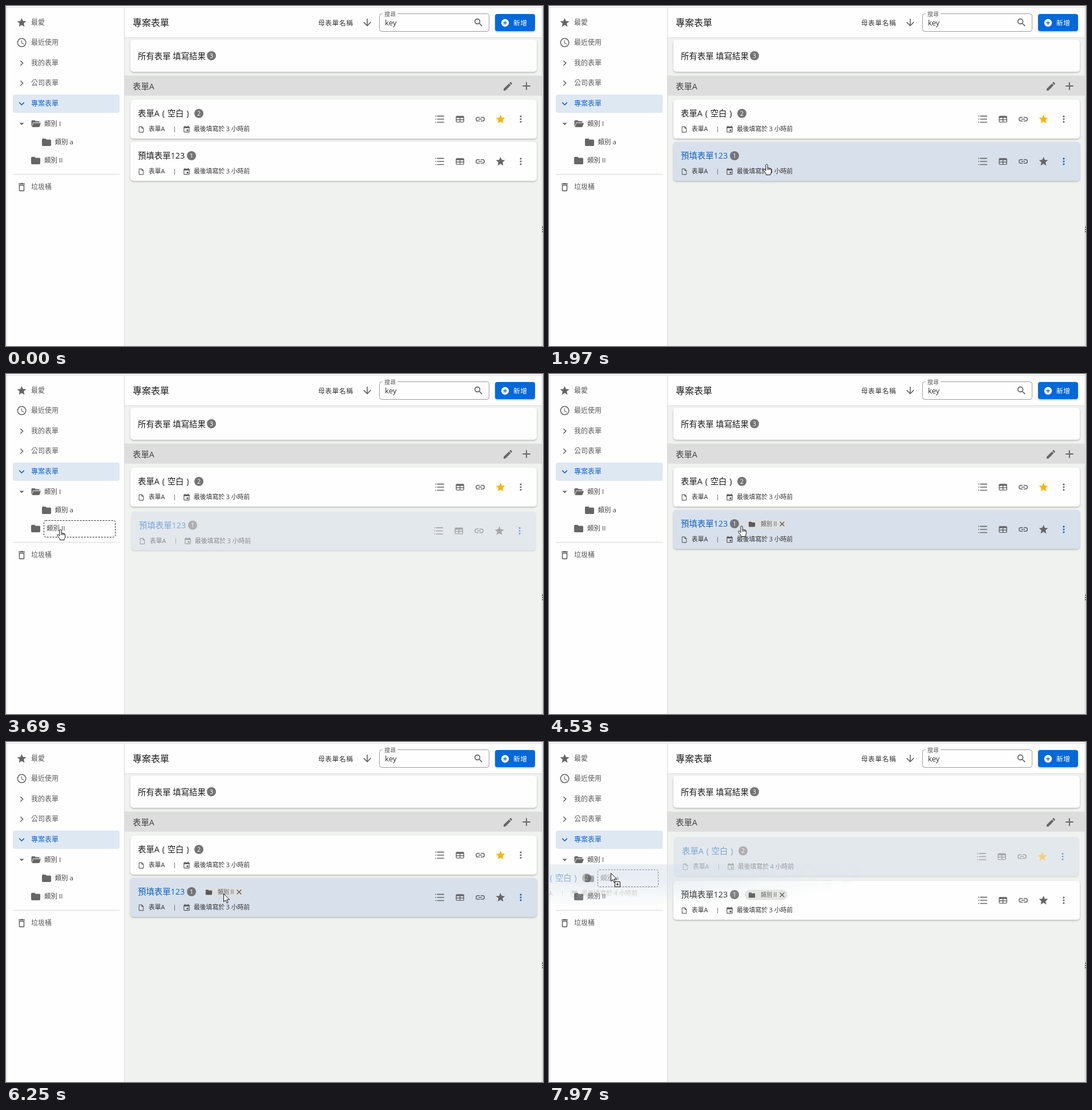
Write an HTML page with a canvas that moves like this. It is 941x595 px and loops after 8000 ms.

```html
<!DOCTYPE html>
<html lang="zh-Hant">
<head>
<meta charset="utf-8">
<title>專案表單</title>
<style>
html, body { margin: 0; width: 100%; height: 100%; overflow: hidden; background: #f0f2f0; }
canvas { display: block; }
</style>
</head>
<body>
<canvas id="stage" width="941" height="595"></canvas>
<script>
const W = 941, H = 595, LOOP = 8000;
const FONT = '"Open Sans", "Noto Sans CJK TC", "Noto Sans CJK JP", "Noto Sans CJK", sans-serif';
const WHITE = '#fdfefd', BLUE = '#1265c4', GREY = '#666', INK = '#1e1e1e', SOFT = '#5a5a5a';

// Icons on a 24 unit grid
const ICON = {
  star: 'M12 17.27 18.18 21l-1.64-7.03L22 9.24l-7.19-.61L12 2 9.19 8.63 2 9.24l5.46 4.73L5.82 21z',
  clock: 'M12 2a10 10 0 1 0 .01 0zM12 4a8 8 0 1 1-.01 0zM12.5 7H11v6l5.25 3.15.75-1.23-4.5-2.67z',
  right: 'M10 6 8.59 7.41 13.17 12l-4.58 4.59L10 18l6-6z',
  down: 'M16.59 8.59 12 13.17 7.41 8.59 6 10l6 6 6-6z',
  caret: 'M7 10l5 5 5-5z',
  folder: 'M10 4H4q-2 0-2 2v12q0 2 2 2h16q2 0 2-2V8q0-2-2-2h-8z',
  open: 'M2 18V6q0-2 2-2h6l2 2h7q2 0 2 2v1H6L3 18zM6.7 10.3H24l-2.8 8q-.6 1.7-2.4 1.7H3.2z',
  trash: 'M6 19c0 1.1.9 2 2 2h8c1.1 0 2-.9 2-2V7H6zM8 9h8v10H8zM15.5 4l-1-1h-5l-1 1H5v2h14V4z',
  search: 'M15.5 14h-.79l-.28-.27A6.5 6.5 0 1 0 13.73 14.43l.27.28v.79l5 4.99L20.49 19zM9.5 14a4.5 4.5 0 1 1 .01 0z',
  arrow: 'M20 12l-1.41-1.41L13 16.17V4h-2v12.17l-5.58-5.59L4 12l8 8z',
  plusDisc: 'M12 2a10 10 0 1 0 .01 0zM17 13h-4v4h-2v-4H7v-2h4V7h2v4h4z',
  plus: 'M19 13h-6v6h-2v-6H5v-2h6V5h2v6h6z',
  pencil: 'M3 17.25V21h3.75L17.81 9.94l-3.75-3.75zM20.71 7.04c.39-.39.39-1.02 0-1.41l-2.34-2.34a1 1 0 0 0-1.41 0l-1.83 1.83 3.75 3.75z',
  list: 'M2 4h2v2H2zM2 11h2v2H2zM2 18h2v2H2zM6 4h16v2H6zM6 11h16v2H6zM6 18h16v2H6z',
  table: 'M5 4h14q3 0 3 3v10q0 3-3 3H5q-3 0-3-3V7q0-3 3-3zM4 9v3.5h7V9zM13 9v3.5h7V9zM4 14.5V18h7v-3.5zM13 14.5V18h7v-3.5z',
  link: 'M3.9 12c0-1.71 1.39-3.1 3.1-3.1h4V7H7a5 5 0 0 0 0 10h4v-1.9H7c-1.71 0-3.1-1.39-3.1-3.1zM8 13h8v-2H8zM17 7h-4v1.9h4a3.1 3.1 0 0 1 0 6.2h-4V17h4a5 5 0 0 0 0-10z',
  more: 'M12 4a2 2 0 1 0 .01 0zM12 10a2 2 0 1 0 .01 0zM12 16a2 2 0 1 0 .01 0z',
  page: 'M14 2H6q-2 0-2 2v16q0 2 2 2h12q2 0 2-2V8zM6 20V4h7v5h5v11z',
  date: 'M17 12h-5v5h5zM16 1v2H8V1H6v2H5q-2 0-2 2v14q0 2 2 2h14q2 0 2-2V5q0-2-2-2h-1V1zM19 19H5V8h14z',
  close: 'M19 6.41 17.59 5 12 10.59 6.41 5 5 6.41 10.59 12 5 17.59 6.41 19 12 13.41 17.59 19 19 17.59 13.41 12z'
};
for (const k in ICON) ICON[k] = new Path2D(ICON[k]);

const ARROW = new Path2D('M0 0V14.2l3.2-3 2.3 5.2 2.2-1-2.3-5H10z');
const HAND = new Path2D('M-1.6 1.6q1.6-2.6 3.2 0V7q1.2-.8 2.3.4 1.3-.7 2.3.6 1.6-.3 1.9 1.3v4q0 2-1.5 3.6V19h-7.6v-1.8L-5 12q-1.2-2 0-2.7 1.3-.4 2.3 1.1l1.1 1.4z');

// Pointer track: time, x, y
const TRACK = [
  [500, 302, 338], [700, 326, 255], [900, 330, 190], [1080, 331, 140], [1300, 332, 140],
  [1500, 348, 175], [1650, 370, 238], [1800, 380, 275], [1970, 381, 276], [2190, 381, 277],
  [2350, 365, 277], [2700, 235, 275], [3000, 142, 272], [3300, 96, 271], [3860, 94, 271],
  [4100, 160, 270], [4500, 330, 265], [4700, 374, 265], [5000, 381, 265], [6420, 381, 265],
  [6600, 383, 235], [6750, 383, 205], [6900, 383, 180], [7170, 383, 180], [7250, 380, 179],
  [7350, 360, 184], [7700, 195, 215], [7880, 120, 228], [7970, 108, 229], [8000, 108, 229]
];
const DRAGS = [
  { card: 'b', from: 2190, drop: 3640, end: 3780, grab: [381, 277] },
  { card: 'a', from: 7250, drop: LOOP, end: LOOP, grab: [380, 179] }
];

const stage = document.getElementById('stage').getContext('2d');
const layer = document.createElement('canvas');
layer.width = W;
layer.height = H;
const buffer = layer.getContext('2d');
let c = stage;

function rect(x, y, w, h, fill) {
  c.fillStyle = fill;
  c.fillRect(x, y, w, h);
}

function round(x, y, w, h, r, fill, shadow) {
  c.save();
  if (shadow) {
    c.shadowColor = 'rgba(0,0,0,.24)';
    c.shadowBlur = 3;
    c.shadowOffsetY = 1.5;
  }
  c.fillStyle = fill;
  c.beginPath();
  c.roundRect(x, y, w, h, r);
  c.fill();
  c.restore();
}

function frame(x, y, w, h, r, color, dash = []) {
  c.save();
  c.strokeStyle = color;
  c.setLineDash(dash);
  c.beginPath();
  c.roundRect(x + .5, y + .5, w - 1, h - 1, r);
  c.stroke();
  c.restore();
}

// y is the visual middle of the line
function text(s, x, y, size, color, spacing = 0, weight = 400) {
  c.font = `${weight} ${size}px ${FONT}`;
  c.letterSpacing = spacing + 'px';
  c.fillStyle = color;
  c.fillText(s, x, y + size * .37);
}

function icon(name, cx, cy, size, color) {
  c.save();
  c.translate(cx - size / 2, cy - size / 2);
  c.scale(size / 24, size / 24);
  c.fillStyle = color;
  c.fill(ICON[name], 'evenodd');
  c.restore();
}

function badge(n, x, y) {
  c.fillStyle = '#757575';
  c.beginPath();
  c.arc(x, y, 8, 0, 7);
  c.fill();
  c.textAlign = 'center';
  text(n, x, y, 10.5, '#fff');
  c.textAlign = 'left';
}

function pointer(t) {
  if (t < TRACK[0][0]) return null;
  const i = TRACK.findIndex(p => p[0] > t);
  const [t0, x0, y0] = TRACK[i - 1], [t1, x1, y1] = TRACK[i];
  const k = (t - t0) / (t1 - t0);
  return { x: x0 + (x1 - x0) * k, y: y0 + (y1 - y0) * k };
}

const inside = (p, x, y, w, h) => !!p && p.x >= x && p.x < x + w && p.y >= y && p.y < y + h;

function stateAt(t) {
  const p = pointer(t);
  const drag = DRAGS.find(d => t >= d.from && t < d.end);
  const focus = t < 1820 ? '' : t < 7170 ? 'b' : 'a';
  let hover = '';
  if (drag) hover = drag.card;
  else if (inside(p, 218, 164, 712, 68)) hover = 'a';
  else if (inside(p, 218, 238, 712, 68)) hover = 'b';
  else if (inside(p, 208, 122, 731, 35)) hover = 'group';
  let target = '';
  if (drag && inside(p, 85, 223, 107, 31)) target = 'a';
  if (drag && inside(p, 66, 256, 126, 30)) target = 'II';
  return { t, p, drag, focus, hover, target, held: drag && t < drag.drop, tagged: t >= 3880 };
}

function sidebar(s) {
  rect(0, 3, 207, H, WHITE);
  rect(207, 3, 1, H, '#d8d9d8');
  rect(1, 3, 1, H, '#e0e1e0');
  round(12, 155, 187, 32, 4, '#dee8f3');
  const rows = [['star', '最愛', 29], ['clock', '最近使用', 64], ['right', '我的表單', 100],
    ['right', '公司表單', 135], ['down', '專案表單', 171], ['trash', '垃圾桶', 317]];
  for (const [name, label, y] of rows) {
    const on = name === 'down';
    icon(name, 27.5, y, 19.2, on ? BLUE : GREY);
    text(label, 44, y, 12, on ? BLUE : SOFT, 0, on ? 500 : 400);
  }
  icon('caret', 27.5, 206, 19.2, GREY);
  icon('open', 52, 206, 18, GREY);
  text('類別 I', 67, 206, 11.5, '#444');
  icon('folder', 71, 238.5, 19.2, GREY);
  text('類別 a', s.target === 'a' ? 90 : 85.5, 238, 11.5, '#444');
  icon('folder', 52, 270.5, 19.2, GREY);
  text('類別 II', s.target === 'II' ? 71 : 67, 270, 11.5, '#444');
  if (s.target === 'a') frame(85, 223, 107, 31, 3, '#222', [3, 2]);
  if (s.target === 'II') frame(66, 256, 126, 30, 3, '#222', [3, 2]);
  rect(12, 294, 187, 1, '#d5d6d5');
}

function header() {
  rect(208, 3, 732, 52, WHITE);
  rect(208, 55, 732, 1, '#d9dad9');
  text('專案表單', 222, 29.5, 16, INK);
  text('母表單名稱', 547, 29.5, 11.5, '#333', .8);
  icon('arrow', 633, 29, 20, GREY);
  frame(654, 13, 193, 32, 4, '#9a9a9a');
  rect(660, 12, 26, 3, WHITE);
  text('搜尋', 663, 14.5, 10, SOFT);
  text('key', 664, 29.5, 13.2, '#333');
  icon('search', 828, 29, 19.2, GREY);
  round(857, 14, 70, 30, 4, '#0568d6', true);
  icon('plusDisc', 874.5, 29.5, 16, '#fff');
  text('新增', 889, 29.5, 11.8, '#fff', .5, 500);
}

function chip(x, y) {
  round(x, y - 9, 75, 18, 9, 'rgba(224,224,221,.8)');
  icon('folder', x + 12.5, y + .5, 13.5, SOFT);
  text('類別 II', x + 28, y, 10, '#555');
  icon('close', x + 65.5, y, 14.4, '#444');
}

function card(id, y, s, inset) {
  const first = id === 'a', hot = s.hover === id, focused = s.focus === id;
  const fill = hot ? (focused ? '#d8e0ec' : '#e6f0fb') : focused ? '#ebecea' : WHITE;
  const x = 218 + inset, top = y + inset * 1.25;
  round(x, top, 712 - inset * 2, 68, 5, fill, true);
  text(first ? '表單A\u2004(\u2004空白\u2004)' : '預填表單123', x + 13, top + 24, 14.4, hot ? BLUE : INK);
  badge(first ? '2' : '1', x + (first ? 120 : 107), top + 24);
  if (!first && s.tagged) chip(x + 125, top + 24.5);
  icon('page', x + 19, top + 52, 13, SOFT);
  text('表單A', x + 32, top + 51.5, 10.8, '#333');
  rect(x + 77, top + 47, 1, 10, '#777');
  icon('date', x + 98.5, top + 52, 14, SOFT);
  const hours = first && s.t >= 6500 ? 4 : 3;
  text(`最後填寫於 ${hours} 小時前`, x + 111, top + 51.5, 10.8, '#333');
  const right = 930 - inset, mid = top + 34;
  icon('list', right - 170, mid, 18.5, GREY);
  icon('table', right - 134.5, mid, 17.5, GREY);
  icon('link', right - 99, mid, 19.2, GREY);
  icon('star', right - 63.5, mid, 19.2, first ? '#fbb117' : GREY);
  icon('more', right - 28, mid, 19.2, hot ? BLUE : GREY);
}

// Paints on the buffer, so that the result can be blended as one picture
function onBuffer(paint) {
  c = buffer;
  c.clearRect(0, 0, W, H);
  paint();
  c = stage;
}

function cards(s) {
  round(218, 59, 712, 56, 5, WHITE, true);
  text('所有表單 填寫結果', 231, 87.5, 14.4, INK);
  badge('3', 360, 87);

  const on = s.hover === 'group';
  rect(208, 122, 731, 35, '#dcdddc');
  text('表單A', 222, 141, 14.4, on ? BLUE : '#444');
  icon('pencil', 879.5, 140.5, 20, on ? BLUE : GREY);
  icon('plus', 912, 140, 23, on ? BLUE : GREY);

  let y = 164;
  for (const id of ['a', 'b']) {
    if (s.drag && s.drag.card === id) {
      onBuffer(() => card(id, y, s, 2));
      c.globalAlpha = .53;
      c.drawImage(layer, 0, 0);
      c.globalAlpha = 1;
      y += 79;
    } else {
      card(id, y, s, 0);
      y += 74;
    }
  }
}

// Dragged copy of the card, fading out in an ellipse around the grab point
function dragImage(s) {
  const { card: id, grab: [gx, gy] } = s.drag;
  onBuffer(() => {
    card(id, id === 'a' ? 164 : 238, s, 0);
    const fade = c.createRadialGradient(0, 0, 0, 0, 0, 1);
    fade.addColorStop(0, 'rgba(0,0,0,.62)');
    fade.addColorStop(.3, 'rgba(0,0,0,.48)');
    fade.addColorStop(.65, 'rgba(0,0,0,.2)');
    fade.addColorStop(1, 'rgba(0,0,0,0)');
    c.save();
    c.globalCompositeOperation = 'destination-in';
    c.translate(gx, gy);
    c.scale(455, 60);
    rect(-5, -10, 10, 20, fade);
    c.restore();
  });
  c.drawImage(layer, Math.round(s.p.x - gx), Math.round(s.p.y - gy));
}

function cursor(s) {
  const onCard = s.hover === 'a' || s.hover === 'b';
  const onChip = s.tagged && inside(s.p, 343, 253, 75, 18);
  const hand = !s.held && !onChip && (onCard || s.p.x < 198);
  c.save();
  c.translate(Math.round(s.p.x) + .5, Math.round(s.p.y) + .5);
  c.fillStyle = '#fff';
  c.strokeStyle = '#111';
  c.lineJoin = 'round';
  const shape = hand ? HAND : ARROW;
  c.fill(shape);
  c.stroke(shape);
  if (hand) {
    c.beginPath();
    for (const x of [1.6, 3.9, 6.1]) {
      c.moveTo(x, 7);
      c.lineTo(x, 10.5);
    }
    c.stroke();
  }
  if (s.held) {
    c.fillRect(7, 15, 9, 9);
    c.strokeRect(7, 15, 9, 9);
    c.beginPath();
    c.moveTo(9, 19.5);
    c.lineTo(14, 19.5);
    c.moveTo(11.5, 17);
    c.lineTo(11.5, 22);
    c.stroke();
  }
  c.restore();
}

function draw(t) {
  const s = stateAt(t);
  rect(0, 0, W, H, '#f0f2f0');
  rect(0, 0, W, 2, WHITE);
  rect(0, 2, W, 1, '#d9dad9');
  sidebar(s);
  header();
  cards(s);
  rect(939, 0, 1, H, '#c6c7c6');
  rect(940, 0, 1, H, '#eeefee');
  for (let y = 386; y < 396; y += 4) rect(939, y, 2, 2, '#666');
  if (s.held) dragImage(s);
  if (s.p) cursor(s);
}

const start = performance.now();
function tick() {
  draw((performance.now() - start) % LOOP);
  requestAnimationFrame(tick);
}
tick();
</script>
</body>
</html>
```
